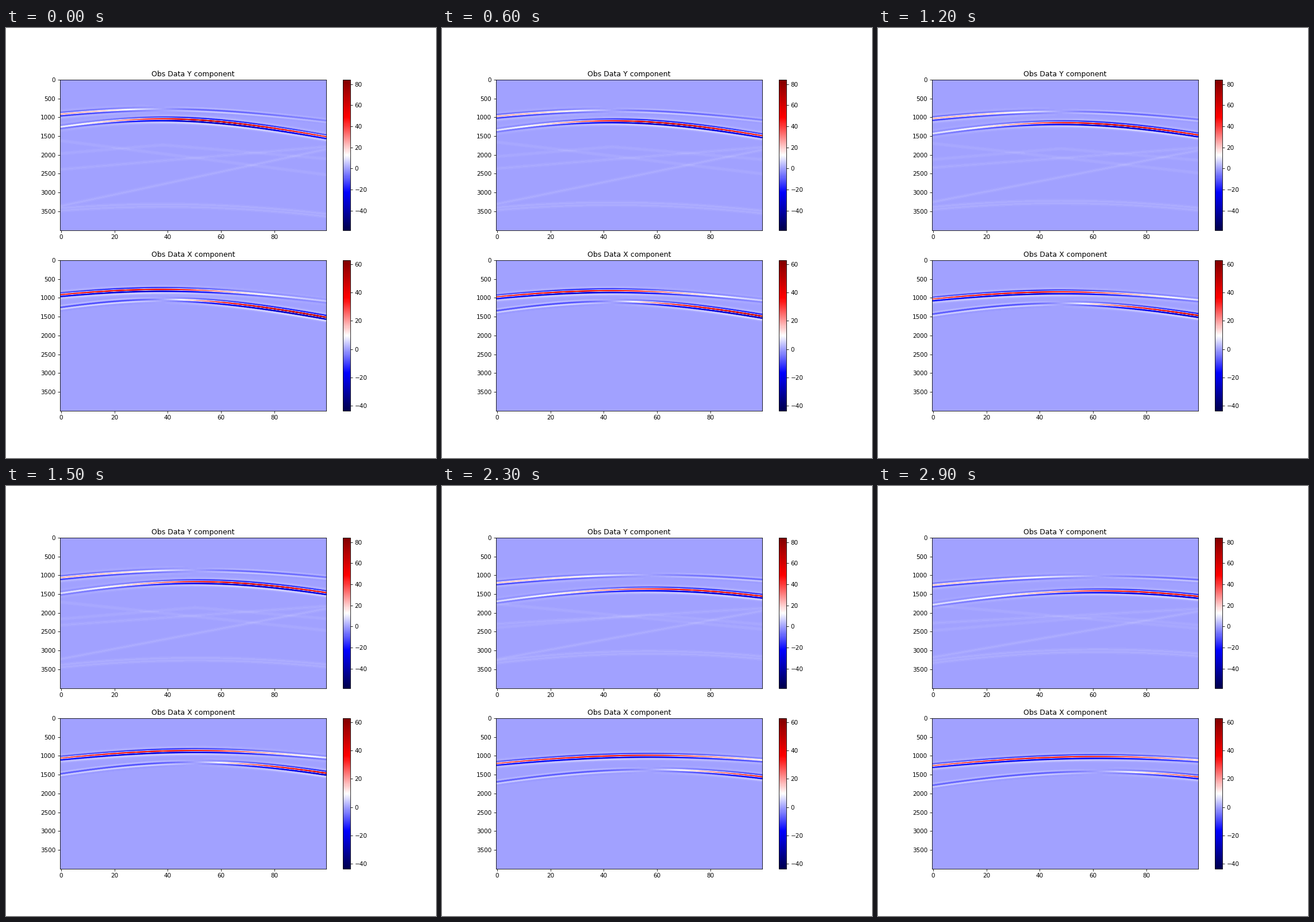
A matplotlib script that plays this animation: 748 by 748 pixels, repeating every 3000 ms.

```python
import numpy as np
import matplotlib.pyplot as plt
from matplotlib.animation import FuncAnimation

FRAMES = 30
SAMPLES, TRACES = 4000, 100
ONSET = 275           # start time of the pulse, in samples
SPACING = 10.4        # P travel time per trace
VP_VS = 1.53

time = np.arange(SAMPLES, dtype=np.float32)[:, None]
trace = np.arange(TRACES, dtype=np.float32)


def bump(t, centre, width):
    return np.exp(-((t - centre) / width) ** 2 / 2)


# Pulse with a deeper trailing lobe and a soft tail
lag = np.arange(-250, 300)
pulse = (1.05 * bump(lag, 0, 17) - 0.34 * bump(lag, -43, 16)
         - 0.67 * bump(lag, 42, 16) + 0.11 * bump(lag, 88, 22)
         + 0.04 * bump(lag, -88, 20))


def arrival(t0, amp):
    return np.interp(time - t0, lag, pulse, left=0, right=0) * amp


def locate(n):
    """Trace position and depth (as P travel time) of shot n."""
    row = 500
    if n % 3 == 2:
        row = 583
    elif n % 3 == 1 and n > 18:
        row = 405
    return 38 + 0.82 * n, row + 5.5 * n


def echoes(n, x0, depth):
    """Faint later arrivals, seen only in the Y component."""
    dx = trace - x0
    deep = ONSET + np.hypot(3800 - 1.4 * depth, 21 * dx)
    left = 3350 - 14 * n + 0.95 * (depth - 500)
    right = 1850 + 0.45 * (depth - 500)
    rise = trace / (TRACES - 1)
    lines = [
        (deep - 70, 1.5),
        (deep, 1.5),
        (left + (right - left) * rise, 1.6),
        (2380 - 4 * n + (right - 2450 + 4 * n) * rise, 1.3),
        (1620 + 6 * n + (900 - 10 * n) * rise, 1.2),
        (1.5 * depth + 980 + 6 * np.abs(dx), 1.1),
    ]
    return sum(amp * bump(time, t0, 22) for t0, amp in lines)


def shot(n):
    x0, depth = locate(n)
    dx = SPACING * (trace - x0)
    path = np.hypot(depth, dx)
    angle = np.arctan2(dx, depth)
    decay = np.sqrt(500 / path)
    p_amp = (5 + 53 * np.cos(angle + np.radians(25)) ** 2) * decay
    s_amp = (16 + 90 * np.cos(angle - np.radians(45)) ** 2) * decay
    p = arrival(ONSET + path, p_amp)
    s = arrival(ONSET + VP_VS * path, s_amp)
    sin, cos = np.sin(angle), np.cos(angle)
    return s * cos - p * sin + echoes(n, x0, depth), p * cos + s * sin


def panel(ax, name, low, high):
    image = ax.imshow(np.zeros((SAMPLES, TRACES)), cmap="seismic",
                      vmin=low, vmax=high, aspect="auto")
    ax.set_title(f"Obs Data {name} component")
    fig.colorbar(image, ax=ax)
    return image


plt.rcParams["font.family"] = "DejaVu Sans"
fig, axes = plt.subplots(2, 1, figsize=(10, 10), dpi=74.8)
images = [panel(axes[0], "Y", -58.5, 84.4),
          panel(axes[1], "X", -43.5, 62.8)]


def update(n):
    for image, data in zip(images, shot(n)):
        image.set_data(data)
    return images


anim = FuncAnimation(fig, update, frames=FRAMES, interval=100,
                     repeat=True, repeat_delay=0)
plt.show()
```
